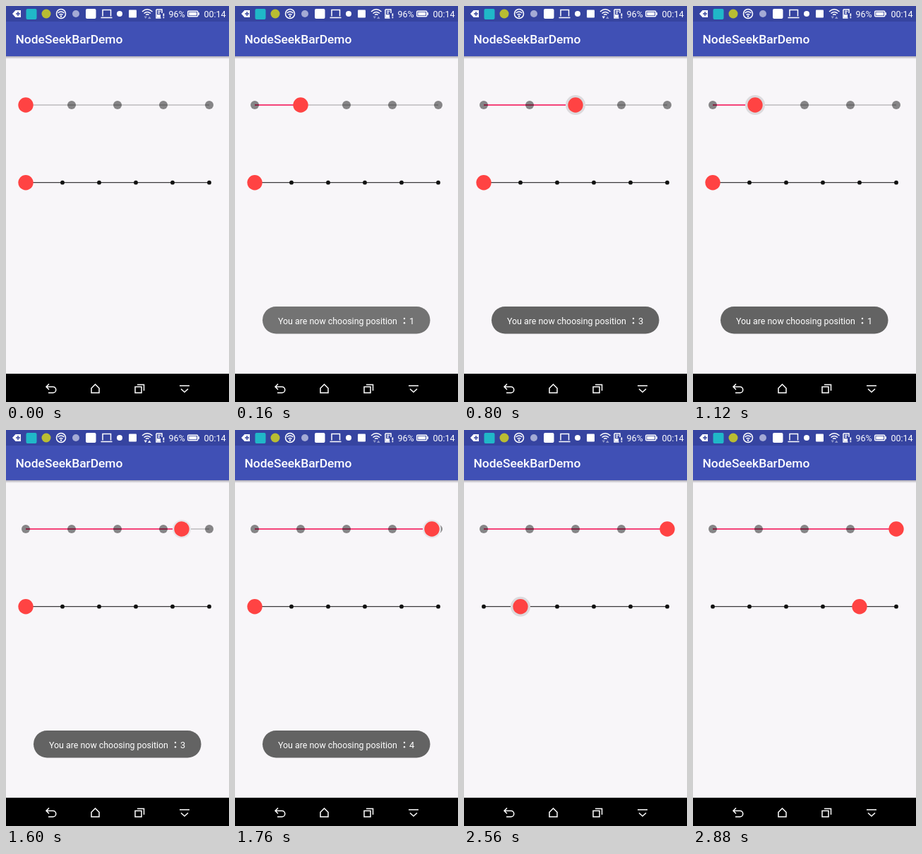
Write an HTML page that moves like this. It is 316 px wide and 560 px high and loops after 3.04 s.

```html
<!DOCTYPE html>
<html lang="en">
<head>
<meta charset="utf-8">
<title>NodeSeekBarDemo</title>
<style>
  html, body { margin: 0; width: 100%; height: 100%; overflow: hidden; background: #f8f6f9; }
  svg { display: block; width: 100%; height: 100%; }
  text { font-family: Roboto, "Noto Sans", sans-serif; fill: #fff; }
  .line { fill: none; stroke: #fff; stroke-width: 1.5; }
</style>
</head>
<body>
<svg viewBox="0 0 316 560">
  <defs>
    <linearGradient id="shade" x2="0" y2="1">
      <stop stop-color="#aaa9b4"/><stop offset="1" stop-color="#f8f6f9"/>
    </linearGradient>
  </defs>
  <rect width="316" height="560" fill="#f8f6f9"/>
  <rect y="71" width="316" height="4" fill="url(#shade)"/>
  <rect width="316" height="71" fill="#4050b5"/>
  <rect width="316" height="22" fill="#3644a0"/>

  <g id="status" fill="#fff">
    <path d="M9 11l4.500-5H21V16h-7.500z"/>
    <path d="M14 11h6M17 8v6" stroke="#3644a0" stroke-width="1.500"/>
    <rect x="28.500" y="4" width="15" height="15" rx="2" fill="#20b8c8"/>
    <circle cx="57" cy="11" r="6.500" fill="#b9bd32"/>
    <circle class="line" cx="78" cy="11" r="6.500" stroke-width="1.200"/>
    <path class="line" d="M73.500 10q4.500-4 9 0M75.500 12.500q2.500-2 5 0"/>
    <circle cx="78" cy="14.500" r="1.200"/>
    <circle cx="99" cy="11" r="5" fill="#a4aad5"/>
    <rect x="113" y="4" width="14.500" height="14" rx="2"/>
    <path class="line" d="M137 14.500V5.500h11.500v9M134.500 16.500h16"/>
    <circle cx="161" cy="11" r="4"/>
    <rect x="174" y="5.500" width="11" height="11" rx="1"/>
    <path class="line" d="M193 8q7-6.500 14.500 0M195.500 10.500q4.700-4 9.500 0M198 12.500q2.200-1.500 4.500 0" stroke-width="1.200"/>
    <path id="down" d="M195.500 14.500h4.500l-2.200 3.500z"/>
    <path id="up" d="M201 18h4.500l-2.200-3.500z"/>
    <path class="line" d="M213 5h8v5M213 5v12h6.500M215 7.500h4M215 10h3"/>
    <path d="M214 12h5v4h-5zM222.500 10.500h1.700v4h-1.700zM222.500 15.500h1.700v1.700h-1.700z"/>
    <text x="230.500" y="15.800" font-size="12.500">96%</text>
    <rect class="line" x="257.700" y="7.200" width="14" height="7.600" rx="1" stroke-width="1.200"/>
    <path d="M259.300 8.800h10.800v4.400h-10.800zM272.300 9.300h1.700v3.400h-1.700z"/>
    <text x="280.500" y="15.800" font-size="12.500">00:14</text>
  </g>
  <text x="13.500" y="53" font-size="17.400" font-weight="500">NodeSeekBarDemo</text>

  <g id="bars"></g>

  <g id="toast">
    <rect id="pill" x="39" y="425" width="237.500" height="38.500" rx="19.200"/>
    <text x="61" y="449.500" font-size="12.400">You are now choosing position</text>
    <circle cx="240" cy="442" r="1.200" fill="#fff"/>
    <circle cx="240" cy="448.200" r="1.200" fill="#fff"/>
    <text id="digit" x="247" y="449.500" font-size="12.800"></text>
  </g>

  <rect y="520" width="316" height="40"/>
  <g class="line">
    <path d="M61 534.500l-4 4 4 4M57 538.500h9.500a4 4 0 0 1 0 8.500H60"/>
    <path d="M121 540.500l5.500-5.500 5.500 5.500V547h-11z"/>
    <path d="M183 538.500h9v8.500h-9zM186 535.500h9.500v8.500"/>
    <path d="M246 537h14M248 541.500l5 4.500 5-4.500"/>
  </g>
</svg>
<script>
const STEP = 160, LEFT = 28, RIGHT = 288;
const el = id => document.getElementById(id);

// One entry per step: thumb x and halo radius (0 = not pressed).
const top1 = [[28, 0], [93, 0], [138, 13], [179, 13], [219, 13], [158, 14], [118, 14],
  [88, 14], [199, 14], [228, 13], [249, 13], [279, 13], [288, 0]];
const low = [[80, 14], [132, 14], [218, 13], [236, 0], [80, 14], [221, 14], [236, 0]];
const lowStart = 12;
const digits = " 11233213334";
const faded = [1, 4];

const dots = (n, y, r, color) => Array.from({ length: n }, (_, i) =>
  `<circle cx="${LEFT + (RIGHT - LEFT) * i / (n - 1)}" cy="${y}" r="${r}" fill="${color}"/>`).join("");

const track = (x1, x2, y, w, color) =>
  `<path d="M${x1} ${y}H${x2}" stroke="${color}" stroke-width="${w}"/>`;

const thumb = ([x, halo], y) =>
  `<circle cx="${x}" cy="${y}" r="${halo}" fill="${halo > 13 ? "#dcdadd" : "#e7e5e8"}"/>` +
  `<circle cx="${x}" cy="${y}" r="10.700" fill="#ff4343"/>`;

function draw(step) {
  const a = top1[Math.min(step, top1.length - 1)];
  const b = step < lowStart ? [LEFT, 0] : low[step - lowStart];
  el("bars").innerHTML =
    track(LEFT, RIGHT, 140, 1.8, "#cbc9cc") + track(LEFT, a[0], 140, 1.8, "#f4437a") +
    dots(5, 140, 6, "rgba(0,0,0,.46)") + thumb(a, 140) +
    track(LEFT, RIGHT, 249.7, 1.3, "#3c3b3d") +
    dots(6, 249.7, 2.9, "#111") + thumb(b, 249.8);

  const shown = step > 0 && step < digits.length;
  el("toast").setAttribute("visibility", shown ? "visible" : "hidden");
  el("pill").setAttribute("fill", faded.includes(step) ? "#737373" : "#636363");
  el("digit").textContent = digits[step] || "";

  const busy = step === 9 || step === 10;
  el("down").setAttribute("opacity", busy || step === 5 ? 1 : .45);
  el("up").setAttribute("opacity", busy ? 1 : .45);
}

let last = -1;
function tick(now) {
  const step = Math.floor(now % 3040 / STEP);
  if (step !== last) draw(last = step);
  requestAnimationFrame(tick);
}
tick(performance.now());
</script>
</body>
</html>
```
